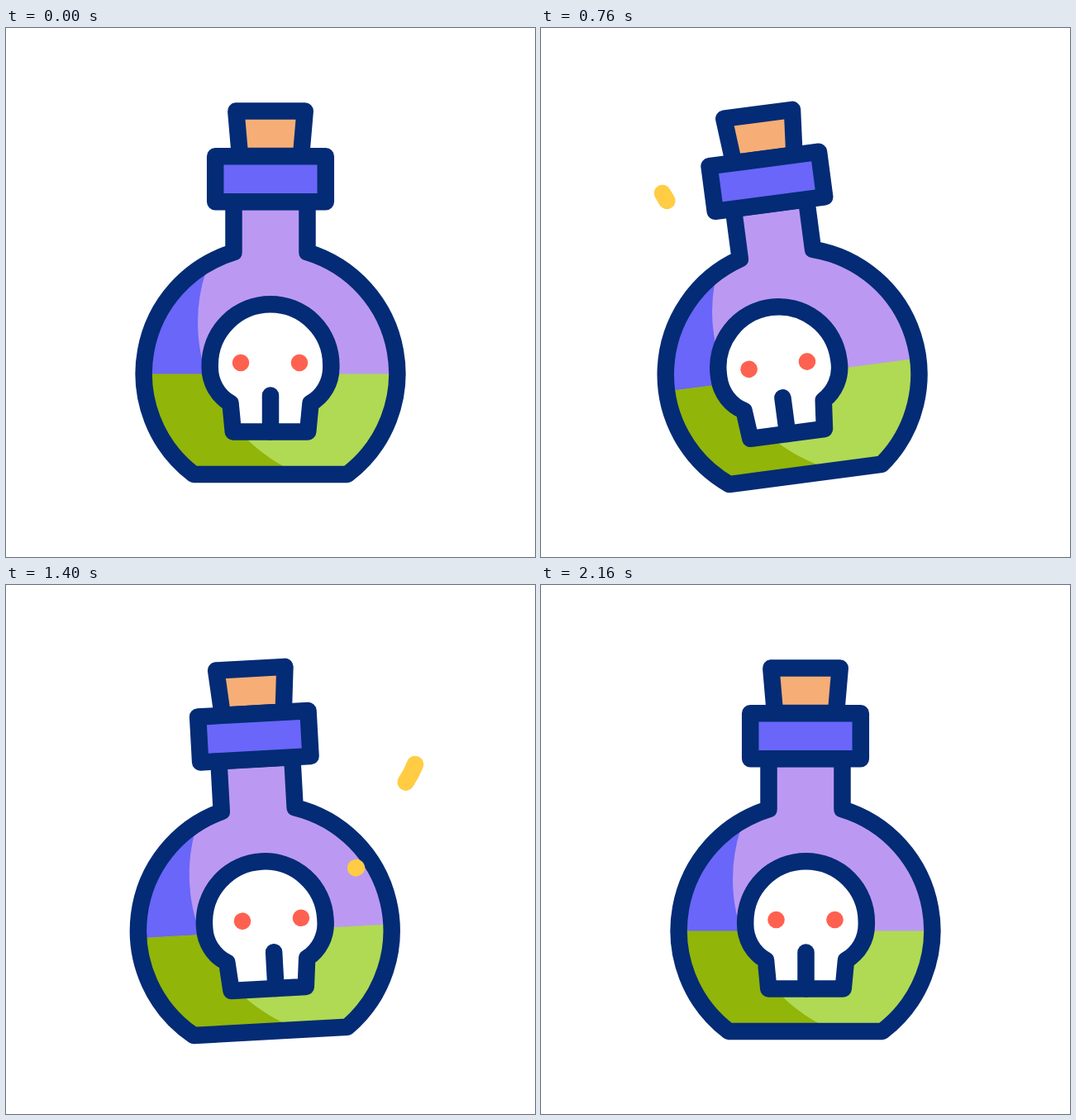
Recreate the animation shown at these times as an HTML page. Size 640x640 px, loop 2.4 s.

```html
<!DOCTYPE html>
<html lang="en">
<head>
<meta charset="utf-8">
<title>Potion</title>
<style>
  html, body { margin: 0; height: 100%; overflow: hidden; background: #fff; }
  svg { display: block; width: 100vw; height: 100vh; }
  .line { stroke: #042b75; stroke-width: 20.5; stroke-linejoin: round; stroke-linecap: round; }
  .swoosh { fill: none; stroke: #ffcc43; stroke-width: 20.5; stroke-linecap: round; }
</style>
</head>
<body>
<svg viewBox="0 0 640 640">
  <defs>
    <path id="body" d="M275.5 210V271.3A153.3 153.3 0 0 0 227 539.9H413A153.3 153.3 0 0 0 364.5 271.3V210Z"/>
    <path id="head" d="M274.8 488.5L271.5 454A49.5 49.5 0 0 1 246.7 411V407.5A73.3 73.3 0 0 1 393.3 407.5V411A49.5 49.5 0 0 1 368.5 454L365.2 488.5Z"/>
    <clipPath id="inBody"><use href="#body"/></clipPath>
    <clipPath id="inLight"><circle cx="430" cy="356" r="198"/><path d="M270 200H370V300H270Z"/></clipPath>
  </defs>
  <g id="bottle">
    <g clip-path="url(#inBody)">
      <path fill="#6966f9" d="M150 200H490V419H150Z"/>
      <path fill="#91b508" d="M150 418.5H490V560H150Z"/>
      <g clip-path="url(#inLight)">
        <path fill="#bb99f2" d="M150 200H490V419H150Z"/>
        <path fill="#b0da53" d="M150 418.5H490V560H150Z"/>
      </g>
      <g id="skull">
        <use href="#head" fill="#fff"/>
        <g id="face">
          <g fill="#ff6150"><circle cx="284" cy="405" r="10.3"/><circle cx="355" cy="405" r="10.3"/></g>
          <path class="line" d="M320 444.5V488.5"/>
        </g>
        <use href="#head" class="line" fill="none"/>
      </g>
    </g>
    <use href="#body" class="line" fill="none"/>
    <path class="line" fill="#f6ae76" d="M278.3 100.5H361.7L357 155H283Z"/>
    <path class="line" fill="#6966f9" d="M253.2 155.2H386.8V210.3H253.2Z"/>
  </g>
  <path class="swoosh" id="long" pathLength="1" d="M147 200C170 240 215 295 343 295C425 293 475 268 495 217"/>
  <path class="swoosh" id="short" pathLength="1" d="M221 333C270 349 360 356 424 342"/>
</svg>
<script>
const LOOP = 2400, SPIN = 480;
const el = id => document.getElementById(id);
const ease = x => (1 - Math.cos(Math.PI * Math.min(1, Math.max(0, x)))) / 2;

// Eased value at time t through [time, value] keys
function track(t, keys) {
  let v = keys[0][1];
  for (let i = 1; i < keys.length; i++) {
    const [t0, v0] = keys[i - 1], [t1, v1] = keys[i];
    if (t >= t0) v = v0 + (v1 - v0) * ease((t - t0) / (t1 - t0));
  }
  return v;
}

const tilt = [[0, 0], [590, -17.7], [985, 8.1], [1330, -4], [1620, 2], [1920, 0]];
const slide = [[0, 0], [580, -68], [602, -68], [1394, SPIN + 0.5]];
const lag = [[1240, 0], [1560, 17.6], [2170, 0]];

function trim(id, t, headStart, headEnd, tailStart, tailEnd) {
  const head = ease((t - headStart) / (headEnd - headStart));
  const tail = ease((t - tailStart) / (tailEnd - tailStart));
  const s = el(id).style;
  s.display = head > 0 && tail < 1 ? "" : "none";
  s.strokeDasharray = `${Math.max(head - tail, 0.0001)} 2`;
  s.strokeDashoffset = -tail;
}

function draw(t) {
  // The skull leaves on the right and comes round from the left
  let x = track(t, slide);
  if (x > SPIN / 2) x -= SPIN;
  el("bottle").setAttribute("transform", `rotate(${track(t, tilt)} 320 540)`);
  el("skull").setAttribute("transform", `translate(${x})`);
  el("face").setAttribute("transform", `translate(${track(t, lag)})`);
  trim("long", t, 700, 1293, 900, 1494);
  trim("short", t, 900, 1300, 1000, 1420);
}

const start = performance.now();
function tick() {
  draw((performance.now() - start) % LOOP);
  requestAnimationFrame(tick);
}
tick();
</script>
</body>
</html>
```
